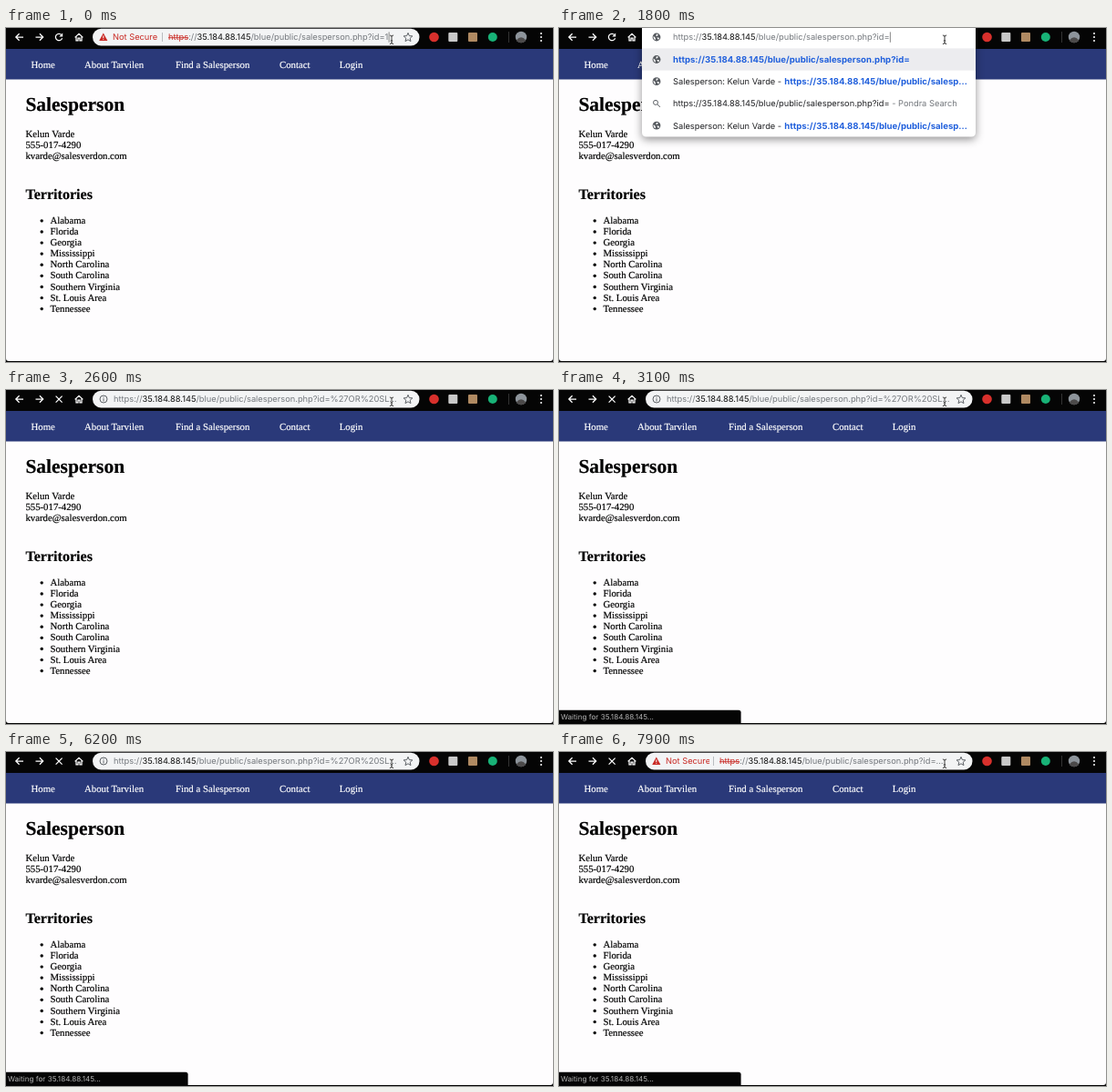
These frames come from a looping animation (600 px wide and 367 px high, 8000 ms). An HTML page:

```html
<!DOCTYPE html>
<html lang="en">
<head>
<meta charset="utf-8">
<title>Salesperson</title>
<style>
  html, body { margin: 0; width: 100%; height: 100%; overflow: hidden; background: #000; }
  svg { display: block; }
  text { text-rendering: geometricPrecision; white-space: pre; }
  .page { font: 10.78px "Liberation Serif", "Noto Serif", serif; fill: #000; stroke: #000; stroke-width: .18; }
  .ui { font: 9.29px Inter, "Noto Sans", sans-serif; fill: #202124; }
  .dim { fill: #74787d; }
  .host { fill: #111; }
  .red { fill: #c92a25; }
  .bad { fill: #c92a25; text-decoration: line-through; }
  .link { font-size: 9.6px; font-weight: 700; fill: #2160dc; }
  .line { fill: none; stroke: #fff; stroke-width: 1.25; }
  .gray { stroke: #5f6368; stroke-width: 1; }
  #nav { fill: #fff; stroke: #fff; }
  #drop { filter: drop-shadow(0 3px 5px rgba(0, 0, 0, .42)); }
</style>
</head>
<body>
<svg width="600" height="367" viewBox="0 0 600 367">
  <defs>
    <g id="globe">
      <circle r="4.4" fill="#55595e"/>
      <path d="M-3.3-1.2L-1.2 1V3.2C-3 2.6-3.7.8-3.3-1.2M-.3-3.2H1.7L1.2-1.5-.6-.8ZM.2.4H2.4L3.2 1.8 1.8 2.8Z" fill="#fff"/>
    </g>
    <g id="lens" class="line gray">
      <circle cx="-1" cy="-1" r="2.5"/>
      <path d="M.9.9L4 4"/>
    </g>
    <path id="beam" fill="none" d="M420.9 8Q423 8 423 9.6V16Q423 17.6 420.9 17.6M425.1 8Q423 8 423 9.6M425.1 17.6Q423 17.6 423 16M421.8 14H424.2"/>
  </defs>

  <!-- web page -->
  <path d="M0 23H600V363Q600 366 597 366H3Q0 366 0 363Z" fill="#fefdfe"/>
  <rect y="23" width="600" height="33.5" fill="#2a3979"/>
  <g class="page">
    <g id="nav"></g>
    <text x="21.4" y="90.6" font-weight="700" style="font-size:21.5px">Salesperson</text>
    <text x="21.4" y="120.3">Kelun Varde</text>
    <text x="21.4" y="132.2">555-017-4290</text>
    <text x="21.4" y="144.1">kvarde@salesverdon.com</text>
    <text x="21.4" y="187.6" font-weight="700" style="font-size:16.1px">Territories</text>
    <g id="list"></g>
  </g>

  <!-- toolbar -->
  <rect width="600" height="23" fill="#050505"/>
  <g class="line">
    <path d="M19 10H11M14.6 6.2L10.8 10l3.8 3.8"/>
    <path d="M32.5 10H40.5M36.9 6.2L40.7 10l-3.8 3.8"/>
    <g id="reload">
      <path d="M60.9 7.6A3.7 3.7 0 1 0 61.6 11.2"/>
      <path d="M62.2 5.6V9.5H58.3Z" fill="#fff" stroke="none"/>
    </g>
    <path id="stop" d="M54.6 6.6L61.6 13.6M61.6 6.6L54.6 13.6"/>
    <path d="M75.6 10.4L80 6.3l4.4 4.1M77 9.6V13.8H79V11.2H81V13.8H83V9.6"/>
  </g>
  <circle cx="469.5" cy="10" r="5.3" fill="#d8302c"/>
  <rect x="485.3" y="5" width="10" height="10" rx="1" fill="#c9c9c9"/>
  <rect x="507" y="5" width="10" height="10" rx="1" fill="#b08a62"/>
  <circle cx="533.8" cy="10" r="5" fill="#18b277"/>
  <path d="M551.5 4V16" stroke="#333"/>
  <circle cx="565" cy="10" r="6.2" fill="#8d949b"/>
  <path d="M559.8 13.4Q565 7 570.2 13.4A6.2 6.2 0 0 1 559.8 13.4" fill="#4c4a4a"/>
  <g fill="#fff"><circle cx="587" cy="6" r="1"/><circle cx="587" cy="10" r="1"/><circle cx="587" cy="14" r="1"/></g>

  <!-- address bar -->
  <g id="pill">
    <rect x="95" y=".7" width="358.5" height="18.7" rx="9.35" fill="#f3f4f5"/>
    <path d="M441 5.4l1.4 3.2 3.5.3-2.7 2.3.8 3.4-3-1.8-3 1.8.8-3.4-2.7-2.3 3.5-.3Z" class="line gray"/>
    <g id="warn">
      <path d="M106.8 5.6L111.4 14H102.2Z" fill="#c92a25"/>
      <path d="M106.8 8.4V11M106.8 11.8V12.8" stroke="#fff"/>
      <svg id="label" x="117" y="0" height="20"><text class="ui red" y="13.4">Not Secure</text></svg>
      <path id="split" d="M0 5V15" stroke="#b9bcc0"/>
    </g>
    <g id="info" class="line gray">
      <circle cx="107" cy="10" r="4"/>
      <path d="M107 7.6V8.6M107 9.4V12.4"/>
    </g>
  </g>

  <!-- suggestions -->
  <g id="drop">
    <path id="sheet" fill="#fff"/>
    <rect x="91" y="22.4" width="366" height="24.2" fill="#ececef"/>
    <g id="typed"></g>
    <g id="pasted"></g>
    <use href="#globe" x="107" y="10"/>
  </g>

  <text id="url" class="ui dim" y="13.4"><tspan id="scheme">https</tspan>://<tspan class="host">35.184.88.145</tspan><tspan id="path"></tspan></text>
  <path id="caret" d="M0 4.4V15.8" stroke="#555" stroke-width=".7"/>

  <g id="status">
    <path d="M0 351.7H197Q199.6 351.7 199.6 354.3V367H0Z" fill="#050505"/>
    <text class="ui" x="2" y="361.8" style="font-size:8.1px;fill:#b4b4b4">Waiting for 35.184.88.145...</text>
  </g>

  <!-- pointer -->
  <use href="#beam" stroke="#fff" stroke-width="2"/>
  <use href="#beam" stroke="#222" stroke-width=".9"/>
</svg>
<script>
const $ = id => document.getElementById(id);
const show = (id, on) => $(id).style.display = on ? '' : 'none';

const PATH = '/blue/public/salesperson.php?id=';
const ADDRESS = 'https://35.184.88.145' + PATH;
const INJECTION = "'OR SLEEP(5)=0--'";

$('nav').innerHTML = [[27.5, 'Home'], [86, 'About Tarvilen'], [186, 'Find a Salesperson'], [300, 'Contact'], [365.7, 'Login']]
  .map(([x, s]) => `<text x="${x}" y="44">${s}</text>`).join('');

$('list').innerHTML = ['Alabama', 'Florida', 'Georgia', 'Mississippi', 'North Carolina', 'South Carolina',
  'Southern Virginia', 'St. Louis Area', 'Tennessee'].map((s, i) => {
    const y = 214.9 + i * 12.1;
    return `<circle cx="39.2" cy="${y - 3.1}" r="1.6"/><text x="48.5" y="${y}">${s}</text>`;
  }).join('');

// One suggestion: icon plus text in row i
const row = (i, icon, text) => {
  const y = 34.5 + i * 24.2;
  return `<use href="#${icon}" x="107" y="${y}"/><text class="ui" x="125" y="${y + 3.4}">${text}</text>`;
};
const link = s => `<tspan class="link">${s}</tspan>`;
const visited = 'Salesperson: Kelun Varde - <tspan x="247.3" class="link">https://35.184.88.145/blue/public/salesp…</tspan>';
$('typed').innerHTML = row(0, 'globe', link(ADDRESS)) + row(1, 'globe', visited) +
  row(2, 'lens', ADDRESS + '<tspan class="dim"> - Pondra Search</tspan>') + row(3, 'globe', visited);
$('pasted').innerHTML = row(0, 'globe', link(ADDRESS + "'OR SLEEP…")) + row(1, 'lens', ADDRESS + INJECTION);

function draw() {
  const t = performance.now() % 8000;
  const editing = t >= 800 && t < 2600;
  const pasted = t >= 1900;
  const warned = t < 800 || t >= 7800;
  const loading = t >= 2600;

  show('reload', !loading);
  show('stop', loading);
  show('pill', !editing);
  show('warn', warned);
  show('info', !warned);
  show('drop', editing);
  show('typed', !pasted);
  show('pasted', pasted);
  const bottom = pasted ? 71.2 : 119.4;
  $('sheet').setAttribute('d', `M91 0H457V${bottom - 5}q0 5-5 5H96q-5 0-5-5Z`);

  // The warning label slides open and pushes the address right
  const width = t < 800 ? 50 : t < 7900 ? 24 : 48;
  $('label').setAttribute('width', width);
  $('split').setAttribute('transform', `translate(${121.5 + width})`);

  const x = editing ? 125 : warned ? 128 + width : 118;
  const tail = t < 800 ? '1' : t < 1900 ? '' : t < 2600 ? INJECTION
    : t < 7800 ? '%27OR%20SL…' : t < 7900 ? '%27O…' : '…';
  $('url').setAttribute('x', x);
  $('path').textContent = PATH + tail;
  $('scheme').setAttribute('class', warned ? 'bad' : '');

  const focusTime = t < 800 ? t : t < 1900 ? t - 800 : t - 1900;
  show('caret', t < 2600 && focusTime % 1000 < 500);
  $('caret').setAttribute('transform', `translate(${x + $('url').getComputedTextLength() + .8})`);

  $('status').style.opacity = t < 3000 ? 0 : t < 3100 ? .5 : 1;
  requestAnimationFrame(draw);
}
draw();
</script>
</body>
</html>
```
